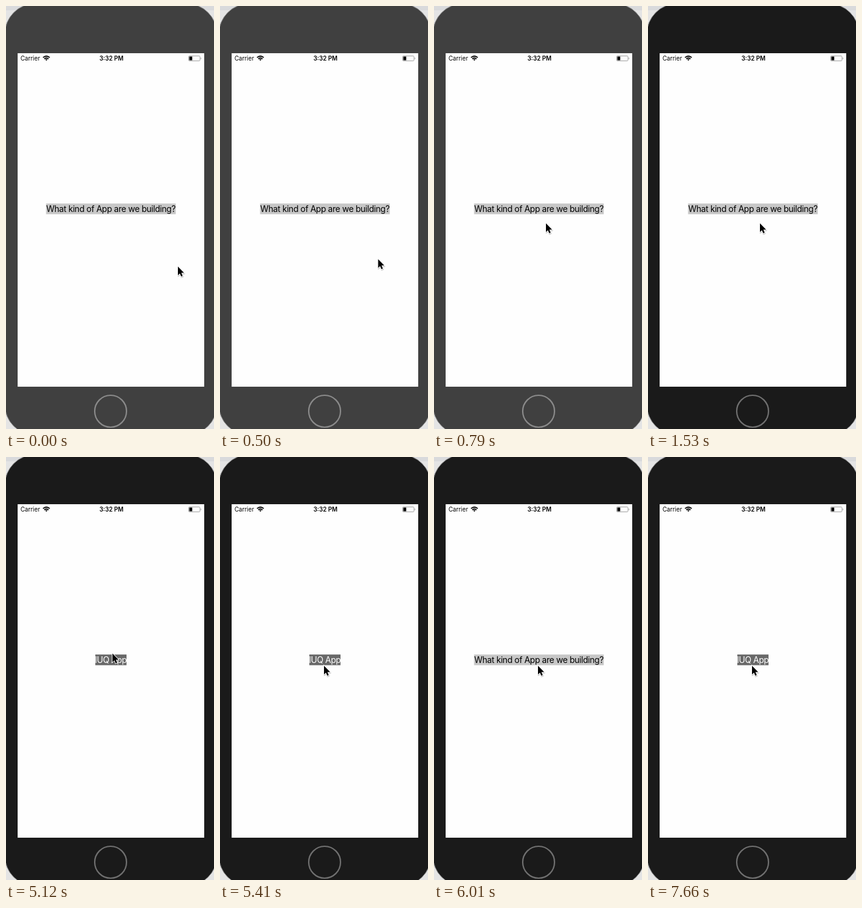
Animation of 340 by 690 pixels, one loop 8000 ms. Source, as an HTML page:

```html
<!DOCTYPE html>
<html lang="en">
<head>
<meta charset="utf-8">
<title>Phone app label</title>
<style>
  html, body { margin: 0; width: 100%; height: 100%; overflow: hidden; background: #ececec; }
  svg { display: block; width: 340px; height: 690px; }
  text { font-family: Inter, Roboto, sans-serif; font-size: 9.76px; }
  #label { font-size: 13.8px; letter-spacing: -.026em; text-anchor: middle; }
</style>
</head>
<body>
<svg viewBox="0 0 340 690">
  <rect width="340" height="690" fill="#e4e4e4"/>
  <rect width="340" height="7" fill="#d9dadc"/>
  <rect id="body" x="-2" y="-4" width="347" height="704" rx="50" stroke="#8c8c8c"/>
  <rect x="19" y="77" width="305" height="544" fill="#fefefe"/>
  <circle id="home" cx="171" cy="661" r="26" fill="none" stroke-width="2.2"/>

  <text x="23.7" y="89">Carrier</text>
  <g fill="none" stroke="#000" stroke-width="1.7">
    <path d="M60.5 84.2Q66 79.3 71.5 84.2M62.5 86.3Q66 83.2 69.5 86.3"/>
    <path d="M64.1 87.2Q66 85.7 67.9 87.2L66 89.2Z" fill="#000" stroke="none"/>
  </g>
  <text x="172.3" y="89" text-anchor="middle" font-weight="600">3:32 PM</text>
  <rect x="298.5" y="81.5" width="18.5" height="8" rx="1.2" fill="none" stroke="#a0a0a0"/>
  <rect x="299.6" y="82.5" width="4.8" height="6" fill="#000"/>
  <path d="M318.2 84a1.6 1.6 0 0 1 0 3z" fill="#a0a0a0"/>

  <rect id="box" y="322.2" height="17.4"/>
  <text id="label" x="171.5" y="336"></text>

  <g id="cursor">
    <path d="M0 0V14.2L3.2 11.2 5.4 16.2 7.7 15.2 5.6 10.3H10Z" transform="translate(.5 1.2)"
      fill="#000" stroke="#000" stroke-width="2.4" stroke-linejoin="round" opacity=".2"/>
    <path d="M0 0V14.2L3.2 11.2 5.4 16.2 7.7 15.2 5.6 10.3H10Z"
      stroke="#fff" stroke-width="1.8" paint-order="stroke"/>
  </g>
</svg>
<script>
const LOOP = 8000;
const $ = id => document.getElementById(id);
const setAttrs = (id, attrs) => {
  for (const name in attrs) $(id).setAttribute(name, attrs[name]);
};

const question = { text: 'What kind of App are we building?', width: 212, fill: '#c7c7c7', ink: '#000' };
const answer = { text: 'lUQ App', width: 51, fill: '#686868', ink: '#fff' };

// Each track holds [start time, value] steps.
const labels = [[0, question], [1680, answer], [6010, question], [7660, answer]];
const shades = [[0, ['#404040', '#8a8a8a']], [1530, ['#1a1a1a', '#707070']]];
const pointer = [
  [0, [281, 425]], [500, [258.5, 413]], [640, [195.5, 353.8]], [790, [183, 354.5]],
  [5120, [174, 320.5]], [5260, [172.5, 324.5]], [5410, [170, 340.5]]
];
const valueAt = (track, t) => track.findLast(([start]) => start <= t)[1];

function draw(t) {
  const label = valueAt(labels, t);
  const [shell, ring] = valueAt(shades, t);
  setAttrs('body', { fill: shell });
  setAttrs('home', { stroke: ring });
  setAttrs('box', { x: 171.5 - label.width / 2, width: label.width, fill: label.fill });
  setAttrs('label', { fill: label.ink });
  $('label').textContent = label.text;
  setAttrs('cursor', { transform: `translate(${valueAt(pointer, t)})` });
}

const begin = performance.now();
function tick() {
  draw((performance.now() - begin) % LOOP);
  requestAnimationFrame(tick);
}
tick();
</script>
</body>
</html>
```
